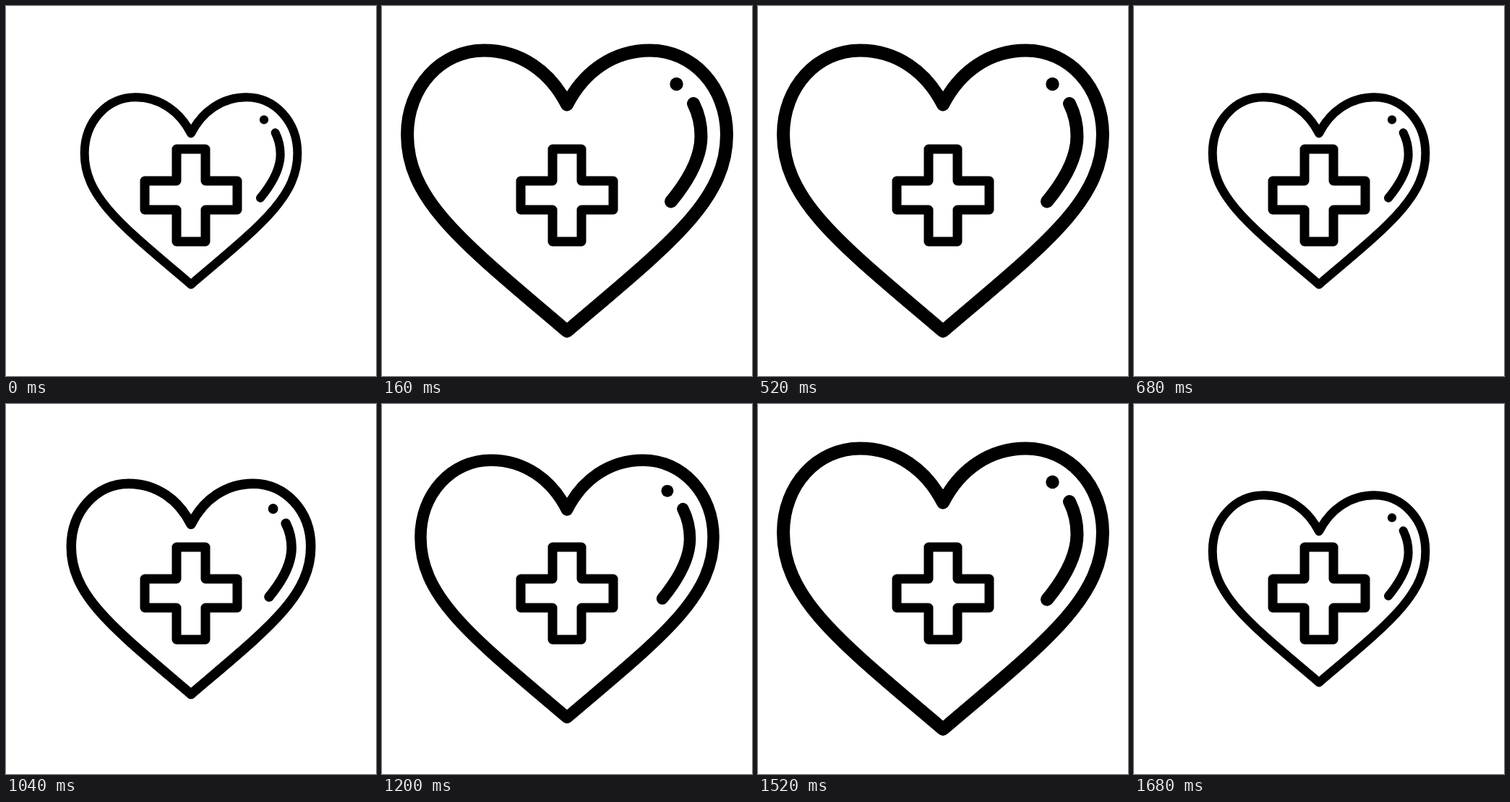
Animation, 512 px wide and 512 px high, one loop 2 s. Source, as an HTML page:

```html
<!DOCTYPE html>
<html lang="en">
<head>
<meta charset="utf-8">
<title>Beating heart</title>
<style>
  html, body { margin: 0; width: 100%; height: 100%; overflow: hidden; background: #fff; }
  svg { display: block; width: 100%; height: 100%; }
  path { fill: none; stroke: #000; stroke-linecap: round; stroke-linejoin: round; }
  #heart { stroke-width: 18; }
  .cross { stroke-width: 13; }
</style>
</head>
<body>
<svg viewBox="0 0 512 512">
  <g id="heart">
    <path stroke-width="18" d="M256 136.5C233 91 192 61.5 141 61.5C82 61.5 35 112 35 178C35 270 115 330 256 450C397 330 477 270 477 178C477 112 430 61.5 371 61.5C320 61.5 279 91 256 136.5Z"/>
    <path d="M431 135C438 149 441.5 165 441.5 180C441.5 207 426 239 400 270.5"/>
    <circle cx="407.5" cy="108" r="9.2"/>
  </g>
  <path class="cross" d="M236 198h40v44h44v40h-44v44h-40v-44h-44v-40h44z"/>
</svg>
<script>
  const heart = document.getElementById('heart');
  const PERIOD = 1000, STEP = 40, FULL = 1.5;

  // Two beats of eight steps, with one step held late in the second rise, then rest.
  function scaleAt(ms) {
    const slot = Math.floor((ms % PERIOD) / STEP);
    const k = slot < 12 ? slot : slot - 1;
    return k < 16 ? 1 + (4 - Math.abs(k % 8 - 4)) / 8 : 1;
  }

  function draw(ms) {
    const s = scaleAt(ms) / FULL;
    heart.setAttribute('transform', `translate(256 256) scale(${s}) translate(-256 -256)`);
  }

  const start = performance.now();
  function tick() {
    draw(performance.now() - start);
    requestAnimationFrame(tick);
  }
  tick();
</script>
</body>
</html>
```
